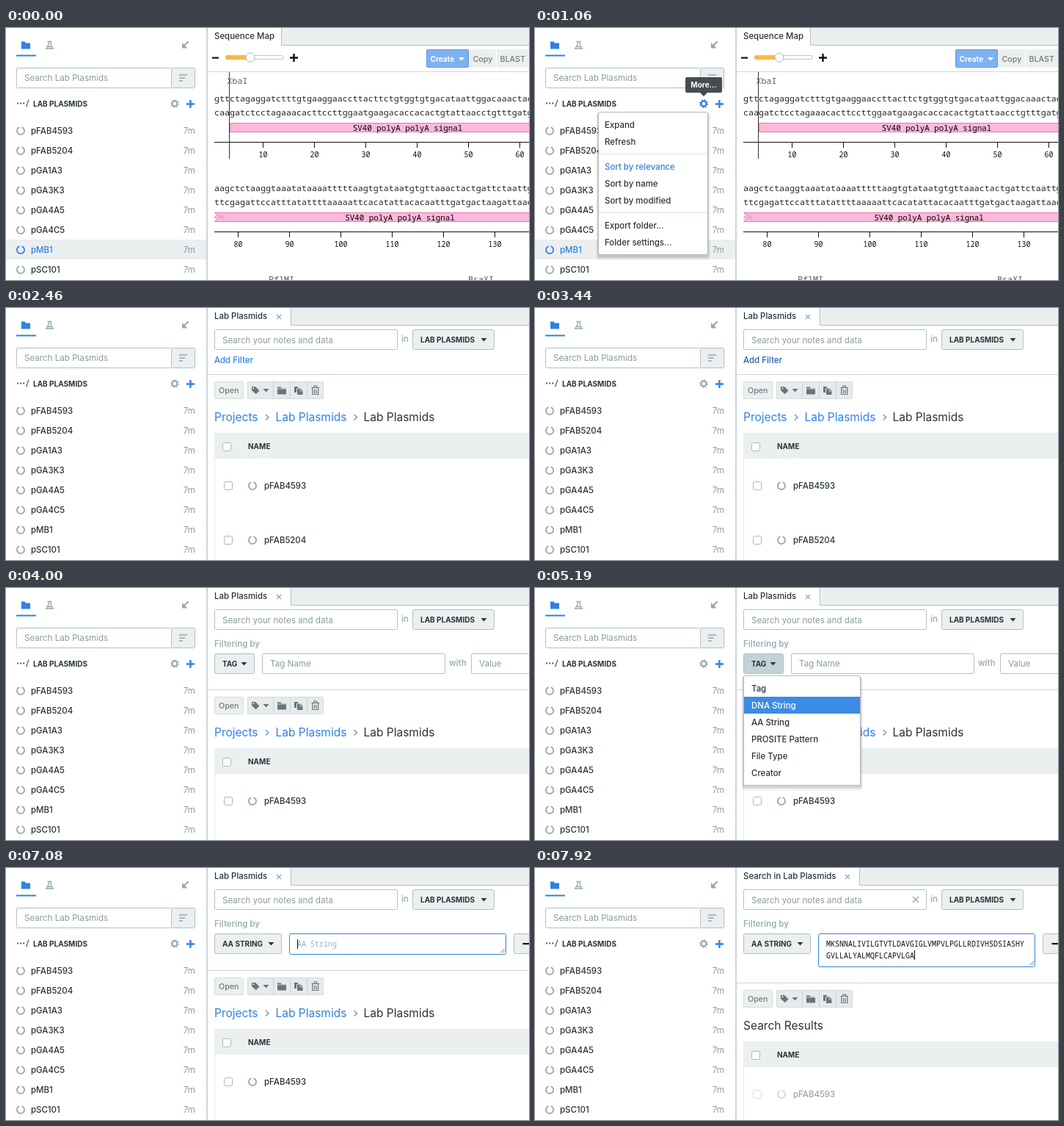
Recreate the animation shown at these times as an HTML page. Size 713 by 343 pixels, loop 8 s.

```html
<!DOCTYPE html>
<html lang="en">
<head>
<meta charset="utf-8">
<title>Plasmid search</title>
<style>
  html, body { margin: 0; width: 100%; height: 100%; overflow: hidden; background: #fff; }
  svg { display: block; width: 713px; height: 343px; }
  text { font: 500 11.45px Inter, sans-serif; fill: #283437; white-space: pre; }
  .gray { font-size: 11.6px; font-weight: 400; fill: #879ba0; }
  .blue { fill: #2f82e0; }
  .deep { fill: #1c62b0; }
  .white { fill: #fff; }
  .soft { fill: #9db0b5; font-weight: 600; }
  .caps { font-size: 10px; font-weight: 700; }
  .tool { font-size: 10.7px; font-weight: 500; fill: #727a7c; }
  .crumb { font-size: 15.5px; font-weight: 400; }
  .seq { font: 11.67px "Noto Sans Mono", monospace; fill: #262626; }
  .label { font: 10.83px "Noto Sans Mono", monospace; fill: #000; }
  .code { font: 10px "Noto Sans Mono", monospace; fill: #111; }
  .pale { fill: #9db0b5; }
  .site { fill: #5c5c5c; }
  .mid { text-anchor: middle; }
  .end { text-anchor: end; }
</style>
</head>
<body>
<svg id="stage" viewBox="0 0 713 343"></svg>
<script>
const LOOP = 8000, TICK = 70;
const BLUE = '#2f82e0', GRAY = '#93a8ae', PANEL = '#ebeff0', EDGE = '#b3c1c5', INK = '#111';
const stage = document.getElementById('stage');
const plasmids = ['pFAB4593', 'pFAB5204', 'pGA1A3', 'pGA3K3', 'pGA4A5', 'pGA4C5', 'pMB1', 'pSC101'];
const strands = [
  'gttctagaggatctttgtgaaggaaccttacttctgtggtgtgacataattggacaaactac',
  'aagctctaaggtaaatataaaatttttaagtgtataatgtgttaaactactgattctaattg'
];
const filters = ['Tag', 'DNA String', 'AA String', 'PROSITE Pattern', 'File Type', 'Creator'];
const protein = ['MKSNNALIVILGTVTLDAVGIGLVMPVLPGLLRDIVHSDSIASHY', 'GVLLALYALMQFLCAPVLGA'];

// Stepped fade: 1/n at start, 1 after n ticks.
const ramp = (t, start, n) => Math.max(0, Math.min(1, (Math.floor((t - start) / TICK) + 1) / n));
const within = (t, a, b) => t >= a && t < b;

const text = (x, y, s, cls = '') => `<text x="${x}" y="${y}" class="${cls}">${s}</text>`;
const rect = (x, y, w, h, fill, more = '') =>
  `<rect x="${x}" y="${y}" width="${w}" height="${h}" fill="${fill}" ${more}/>`;
const box = (x, y, w, h, fill = '#fff', edge = EDGE, r = 1) =>
  rect(x + .5, y + .5, w - 1, h - 1, fill, `stroke="${edge}" rx="${r}"`);
const line = (d, color, w = 1, more = '') =>
  `<path d="${d}" fill="none" stroke="${color}" stroke-width="${w}" ${more}/>`;
const shape = (d, fill, more = '') => `<path d="${d}" fill="${fill}" ${more}/>`;
const group = (s, attr) => `<g ${attr}>${s}</g>`;
const move = (x, y, s) => group(s, `transform="translate(${x} ${y})"`);

const plus = (x, y, color) => line(`M${x - 5.5} ${y}h11M${x} ${y - 5.5}v11`, color, 2.4);
const cross = (x, y, r = 3) => line(`M${x - r} ${y - r}l${2 * r} ${2 * r}m0 ${-2 * r}l${-2 * r} ${2 * r}`, '#9aabaf', 1.4);
const caret = (x, y, color = '#2b383b') => shape(`M${x - 4} ${y - 2}h8l-4 4.6z`, color);
const ring = (x, y, color = GRAY) => line(`M${x + 1.6} ${y - 4.8}a5.1 5.1 0 1 1 -3.2 0`, color, 1.8);
const check = (x, y) => box(x, y, 12, 12, '#fff', '#a9b8bc', 2);
const folder = (x, y, color) => shape(`M${x - 6} ${y - 5}h4.5l1.5 2h6v8h-12z`, color);
const gear = (x, y, color) =>
  `<g fill="none" stroke="${color}"><circle cx="${x}" cy="${y}" r="3.4" stroke-width="2"/>` +
  `<circle cx="${x}" cy="${y}" r="4.9" stroke-width="1.7" stroke-dasharray="1.924 1.924"/></g>`;

const shadow = (x, y, w, h) =>
  rect(x - 3, y + 1, w + 6, h + 6, '#000', 'opacity=".04" rx="5"') +
  rect(x - 2, y + 1, w + 4, h + 4, '#000', 'opacity=".06" rx="4"') +
  rect(x - 1, y + 1, w + 2, h + 2, '#000', 'opacity=".09" rx="3"') +
  box(x, y, w, h, '#fff', '#b4b9bb', 2);

function sidebar(t) {
  const selected = t < 2460 ? 6 : -1;
  const lit = within(t, 500, 2460) ? ramp(t, 500, 3) * (1 - ramp(t, 1550, 4)) : 0;
  let s = rect(0, 0, 273, 343, '#fff') + folder(27, 23.5, BLUE) + rect(14, 36.5, 27, 2, BLUE);
  s += line('M56.5 18.5h6M58 18.5v4l-3.4 5.5h9.8l-3.4-5.5v-4M57 25.5h5', GRAY, 1.3);
  s += line('M248.5 18.5l-6 6', GRAY, 2.2) + shape('M240 20v7.5h7.5z', GRAY);
  s += box(14, 54, 212, 28) + box(225, 54, 33, 28, PANEL);
  s += line('M236 64h11M236 68h8M236 72h5', GRAY, 1.4);
  s += text(25, 72.3, 'Search Lab Plasmids', 'gray');
  s += line('M15 102.5h2.2M19 102.5h2.2M23 102.5h2.2', '#55676c', 2) + line('M27.5 107.5l3.5-10', '#55676c', 1.3);
  s += text(37, 107, 'LAB PLASMIDS', 'caps');
  s += gear(230, 103, GRAY) + group(gear(230, 103, BLUE), `opacity="${lit}"`) + plus(251.5, 103.5, BLUE);
  plasmids.forEach((name, i) => {
    const y = 126 + 27 * i, on = i === selected;
    if (on || (i === 0 && within(t, 2670, 2950))) s += rect(0, y, 273, 27, PANEL);
    s += ring(20, y + 14, on ? BLUE : GRAY) + text(34, y + 18, name, on ? 'blue' : '');
    s += text(258, y + 18, '7m', 'gray end');
  });
  return s + rect(273, 0, 2, 343, '#cbd5d8');
}

function tabBar(title, edge, close) {
  let s = rect(275, 0, 438, 24, PANEL) + rect(275, 0, edge - 275, 24, '#fff');
  s += line(`M${edge + .5} 0V23.5H713`, '#b4c0c4') + text(284, 15, title, 'tab');
  return close ? s + cross(edge - 16, 12) : s;
}

function strandRow(i) {
  const y = 122 * i, start = i ? 284 : 305, first = i ? 316 : 350;
  const pair = { a: 't', t: 'a', g: 'c', c: 'g' };
  let s = text(284, 100 + y, strands[i], 'seq');
  s += text(284, 118.5 + y, strands[i].replace(/./g, c => pair[c]), 'seq');
  const left = i ? 'l3 3-3 3 3 3-3 3' : 'v12';
  s += shape(`M${start + .5} ${129.5 + y}${left}H720v-12z`, '#ffb8dc', 'stroke="#dd79ac"');
  if (i) s += line('M290 255l2.5 2.5-2.5 2.5m3.5-5l2.5 2.5-2.5 2.5', '#de6fa9');
  s += text(i ? 537 : 547.5, 139.5 + y, 'SV40 polyA polyA signal', 'label mid');
  s += line(`M284 ${155.5 + y}H713`, INK);
  for (let k = 0; k < 6; k++) {
    const x = first + 70 * k;
    s += line(`M${x + .5} ${156 + y}v7`, INK) + text(x + .5, 175.5 + y, (i ? 80 : 10) + 10 * k, 'code mid');
  }
  return s;
}

function sequenceMap() {
  let s = tabBar('Sequence Map', 375, false);
  s += rect(281, 39.5, 9, 2.2, INK) + plus(392.5, 40.5, INK);
  s += box(299, 37, 80, 6, '#fff', '#bcc5c8', 3) + rect(299, 37, 34, 6, '#f8b84a', 'rx="3"');
  s += '<circle cx="333" cy="40" r="6" fill="#fff" stroke="#a9b5b9"/>';
  s += box(573, 29, 58, 25, '#7fb1ef', '#5a9ae8') + text(578.5, 45.8, 'Create', 'caps white') + caret(621, 42, '#fff');
  s += rect(631, 29, 37, 25, PANEL) + rect(669, 29, 44, 25, PANEL);
  s += text(636.5, 46, 'Copy', 'tool') + text(673.5, 46, 'BLAST', 'tool');
  s += rect(275, 59, 438, 1, '#cbd5d8');
  s += strandRow(0) + strandRow(1);
  s += text(301.5, 76, 'XbaI', 'seq site') + line('M304.5 60v118', '#333');
  return s + text(358, 346, 'PflMI', 'seq site') + text(630, 346, 'BsaXI', 'seq site');
}

function moreMenu(t) {
  const hover = t >= 1550;
  let s = '';
  if (t >= 1060) {
    s += shadow(86, 114, 150, 195);
    if (hover) s += rect(87, 120, 148, 23, '#3d8be4');
    const item = (y, name, cls) => text(95, y + 4, name, cls);
    s += item(132, 'Expand', hover ? 'white' : '') + item(155, 'Refresh');
    s += item(189, 'Sort by relevance', 'blue') + item(212, 'Sort by name') + item(235, 'Sort by modified');
    s += item(269, 'Export folder...') + item(292, 'Folder settings...');
    s += rect(87, 171, 148, 1, '#dfe4e6') + rect(87, 251, 148, 1, '#dfe4e6');
  }
  const tip = rect(205, 67, 50, 21, '#474c4f', 'rx="2"') + shape('M225 88h10l-5 5z', '#474c4f') +
    text(230, 81, 'More...', 'caps white mid');
  return s + group(tip, `opacity="${ramp(t, 500, 3) * (1 - ramp(t, 1550, 4))}"`);
}

function toolbar() {
  const color = '#66757a';
  let s = box(284, 100, 40, 24, PANEL, '#d3dbdd') + text(290, 116, 'Open', 'tool');
  s += box(329, 100, 104, 24, '#e6eaeb', '#d3dbdd');
  s += line('M364.5 100v24M387.5 100v24M410.5 100v24', '#cbd3d6');
  s += shape('M335 107h5l5.5 5.5-4.8 4.8-5.7-5.3z', color) + '<circle cx="337.4" cy="109.3" r="1" fill="#fff"/>';
  s += caret(354.5, 112, color) + folder(376, 112.5, color) + rect(370, 109.6, 12, .8, '#e6eaeb');
  s += shape('M393 107h5v2h-2v6h-3z', color) + shape('M397 109.5h4.5l3 3v5.5h-7.5z', color);
  s += line('M401 109.5v3.5h3.5', '#e6eaeb', .8);
  s += line('M416.5 108.5h10.5M420 108v-2h3.5v2M417.8 109v8.5h7.9v-8.5M420.5 111v5M423 111v5', color, 1.2);
  return s;
}

function results(found) {
  let s = rect(275, 90, 438, 1, '#cbd5d8') + toolbar();
  if (found) s += text(284, 153.5, 'Search Results', 'crumb');
  else {
    s += text(284, 153.5, 'Projects', 'crumb blue') + text(367.5, 153.5, 'Lab Plasmids', 'crumb blue');
    s += text(487.5, 153.5, 'Lab Plasmids', 'crumb');
    s += line('M354 145l4 3.8-4 3.8M474.5 145l4 3.8-4 3.8', '#8fa3a8', 1.6);
  }
  s += rect(284, 170, 429, 35, PANEL) + check(295, 183) + text(330, 191.8, 'NAME', 'caps');
  s += rect(284, 205, 1, 300, '#e6ebec');
  const rows = [0, 1].map(i => {
    const y = 242 + 74 * i;
    return check(297, y - 6) + ring(336, y) + text(352, y + 4, plasmids[i]);
  }).join('');
  return s + group(rows, `opacity="${found ? .45 : 1}"`);
}

function dropButton(x, y, w, name, dark = 0) {
  return box(x, y, w, 28, PANEL, EDGE, 2) +
    rect(x + 1, y + 1, w - 2, 26, '#c3d2d6', `opacity="${dark}"`) +
    text(x + 11, y + 17.7, name, 'caps') + caret(x + w - 14.5, y + 14);
}

function tagFilter(t) {
  const dark = .5 * ramp(t, 4490, 2) + .5 * ramp(t, 4700, 5);
  let s = dropButton(284, 89, 55, 'TAG', dark);
  s += box(349, 89, 250, 28) + text(360, 107.3, 'Tag Name', 'gray') + text(604, 106, 'with', 'soft');
  return s + box(634, 89, 100, 28) + text(645, 107.3, 'Value', 'gray');
}

function filterMenu(t) {
  const hover = t >= 5400 ? 2 : t >= 5190 ? 1 : t >= 5120 ? 0 : -1;
  return shadow(284, 119, 160, 150) + filters.map((name, i) => {
    const y = 125 + 23 * i, on = i === hover;
    return (on ? rect(285, y, 158, 23, '#3d8be4') : '') + text(295, y + 15.5, name, on ? 'white' : '');
  }).join('');
}

function stringFilter(t) {
  const focus = t >= 7080, filled = t >= 7640, h = filled ? 46 : 29;
  let s = dropButton(284, 89, 92, 'AA STRING', 1 - ramp(t, 5890, 3));
  s += box(386, 89, 296, h, '#fff', focus ? BLUE : EDGE, 2);
  s += line(`M674 ${86.5 + h}l6-6m-3 6l3-3`, '#777');
  if (filled) s += protein.map((row, i) => text(397, 107 + 16 * i, row, 'code')).join('');
  else s += text(397, 107, 'AA String', 'code pale');
  if (focus) s += filled ? rect(517, 112, 1, 13, '#000') : rect(397, 97, 1, 13, '#000');
  s += box(692, 89, 40, 28, within(t, 6240, 6520) ? '#c3d2d6' : PANEL, EDGE, 2);
  return s + rect(704.5, 102, 10, 2.2, INK);
}

function searchPage(t) {
  const found = t >= 7920;
  const drop = t < 4000 ? 0 : t < 5890 ? 48 : t < 7640 ? 49 : 66;
  let s = found ? tabBar('Search in Lab Plasmids', 442, true) : tabBar('Lab Plasmids', 388, true);
  s += box(284, 29, 250, 28) + text(295, 47.5, 'Search your notes and data', 'gray');
  if (found) s += cross(519, 43, 4);
  s += text(539, 46, 'in', 'soft') + dropButton(554, 29, 112, 'LAB PLASMIDS');
  s += move(0, drop, results(found));
  if (!drop) return s + text(284, 75, 'Add Filter', t >= 3440 ? 'deep' : 'blue');
  s += text(284, 80, 'Filtering by', 'soft');
  if (t >= 5890) return s + stringFilter(t);
  return s + tagFilter(t) + (t >= 4700 ? filterMenu(t) : '');
}

let shown = '';
function draw(t) {
  const early = t < 2460;
  const next = (early ? sequenceMap() : searchPage(t)) + sidebar(t) + (early ? moreMenu(t) : '');
  if (next !== shown) stage.innerHTML = shown = next;
}

const begin = performance.now();
function frame() {
  draw((performance.now() - begin) % LOOP);
  requestAnimationFrame(frame);
}
frame();
</script>
</body>
</html>
```
